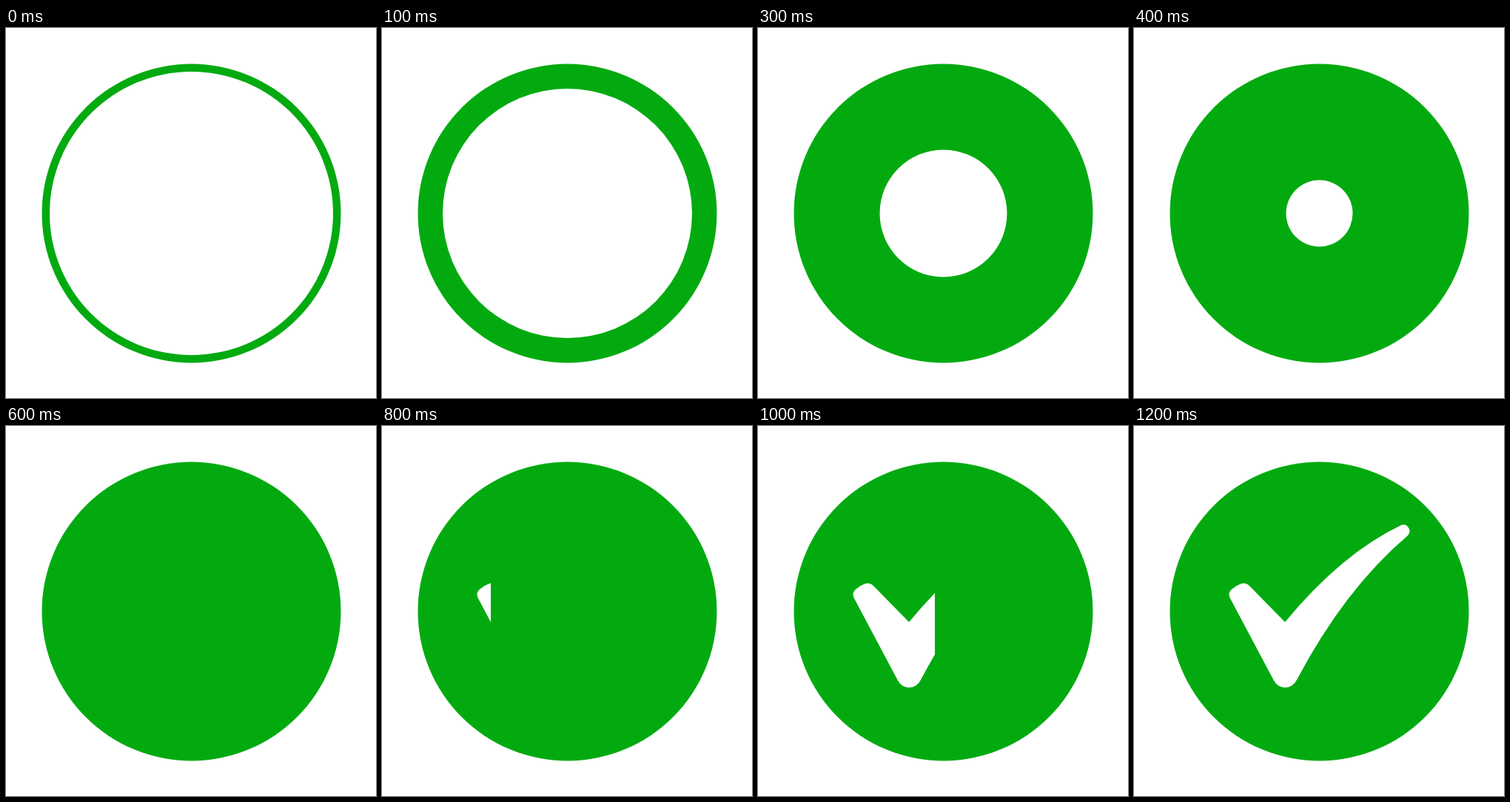
Animation, 500 px wide and 500 px high, one loop 1.3 s. Source, as an HTML page:

```html
<!DOCTYPE html>
<html>
<head>
<meta charset="utf-8">
<style>
  html, body { margin: 0; width: 100%; height: 100%; overflow: hidden; background: #fff; }
  svg { display: block; width: 100vw; height: 100vh; }
</style>
</head>
<body>
<svg viewBox="0 0 500 500">
  <clipPath id="wipe"><rect id="reveal" width="0" height="500"/></clipPath>
  <circle cx="250.5" cy="250.5" r="202" fill="#02aa10"/>
  <circle id="hole" cx="250.5" cy="250.5" r="191.5" fill="#fff"/>
  <path clip-path="url(#wipe)" fill="#fff" d="M130 233 Q126 225 133 220 Q139 215 145 213
    Q151 211 156 216 L204 265 Q281 172 361 134 Q367 132 370 136 Q375 142 370 148
    Q285 220 220 343 Q215 353 204 353.500 Q194 353 189 344 Z"/>
</svg>
<script>
const hole = document.getElementById('hole');
const reveal = document.getElementById('reveal');
const STEP = 100, STEPS = 13;

// Eased positions, one per step: the hole closes, then the tick is wiped in.
const radii = [191.5, 168.5, 127.5, 86, 45, 14, 0];
const edges = [130, 147, 190, 239, 300, 380];

function draw(now) {
  const step = Math.floor(now / STEP) % STEPS;
  hole.setAttribute('r', radii[step] ?? 0);
  reveal.setAttribute('width', edges[step - radii.length] ?? 0);
}

const start = performance.now();
function tick() {
  draw(performance.now() - start);
  requestAnimationFrame(tick);
}
tick();
</script>
</body>
</html>
```
